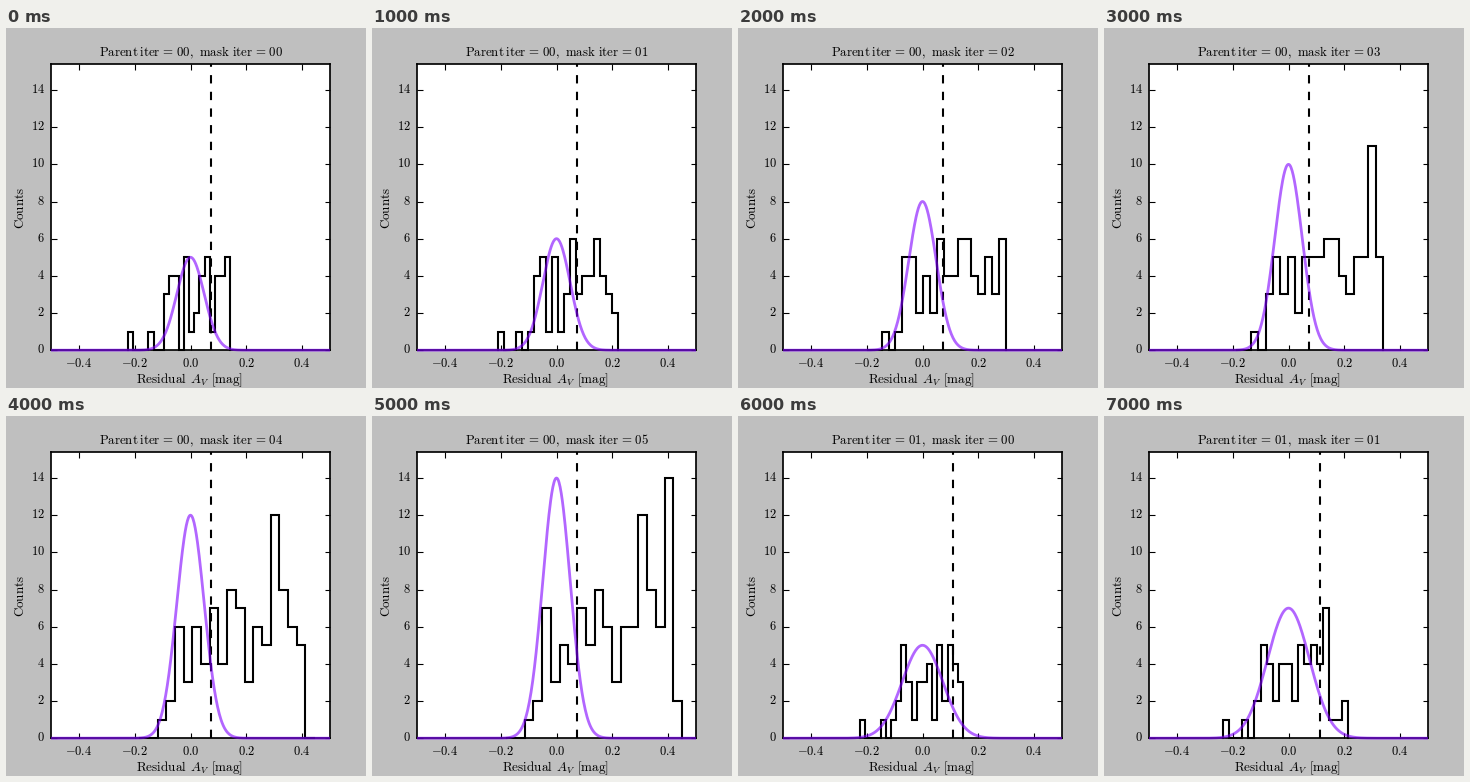
A matplotlib script for the animation above (8000 ms loop, 360x360 px).

```python
import matplotlib.pyplot as plt
import numpy as np
from matplotlib.animation import FuncAnimation

SIZE = 360
LEFT, RIGHT, TOP, BOTTOM = 45, 324, 36, 322.2
Y_MAX = 15.4
BINS = 20
MASKS = 6

plt.rcParams["mathtext.fontset"] = "cm"
plt.rcParams["lines.scale_dashes"] = False
fig = plt.figure(figsize=(SIZE / 72, SIZE / 72), dpi=72, facecolor="0.75")
ax = fig.add_axes([LEFT / SIZE, 1 - BOTTOM / SIZE,
                   (RIGHT - LEFT) / SIZE, (BOTTOM - TOP) / SIZE])
ax.set(xlim=(-0.5, 0.5), ylim=(0, Y_MAX))
ax.set_xticks([-0.4, -0.2, 0, 0.2, 0.4])
ax.set_yticks(range(0, 15, 2))
ax.tick_params(direction="in", length=5.5, width=1.1, top=True, right=True,
               labelbottom=False, labelleft=False)
for spine in ax.spines.values():
    spine.set_linewidth(1.7)


def label(x, y, text, size=12.5, **kw):
    """Place text at stage pixels, y being the baseline."""
    kw = {"ha": "center", "va": "baseline", **kw}
    return fig.text(x / SIZE, 1 - y / SIZE, text, fontsize=size, **kw)


def to_x(px):
    return (px - LEFT) / (RIGHT - LEFT) - 0.5


def title_text(parent, mask):
    eq = r"\hspace{0.12}=\hspace{0.12}"
    return (rf"$\mathrm{{Parent}}\hspace{{0.22}}\mathrm{{iter}}{eq}"
            rf"\mathrm{{{parent:02d},}}\hspace{{0.38}}"
            rf"\mathrm{{mask\ iter}}{eq}\mathrm{{{mask:02d}}}$")


for v in ax.get_xticks():
    label(LEFT + (v + 0.5) * (RIGHT - LEFT), 339, f"${v:.1f}$")
for v in ax.get_yticks():
    y = BOTTOM - v / Y_MAX * (BOTTOM - TOP)
    label(39, y + 3, f"${v:.0f}$", ha="right")

title = label(185, 28, "", 12.9)
label(184, 355, r"$\mathrm{Residual}\hspace{0.42}A_V\hspace{0.42}"
                r"\mathrm{[mag]}$", 13.2)
label(14, 180, r"$\mathrm{Counts}$", 13, rotation=90, va="center")

# All residuals of each parent: first pixel, bin width, counts
profiles = [
    (130.7, 5.1, [1, 0, 0, 0, 1, 0, 0, 3, 4, 4, 0, 5, 1, 2, 4, 5, 1, 4, 4, 5,
                  4, 3, 1, 3, 4, 2, 5, 9, 4, 5, 3, 4, 12, 3, 1]),
    (122, 5.15, [1, 0, 0, 0, 1, 0, 1, 2, 5, 3, 1, 3, 3, 4, 1, 5, 2, 5, 4, 3,
                 6, 1, 1, 1, 2]),
]
rights = [224, 246, 268, 279, 308, 310, 225, 244]
peaks = [5, 6, 8, 10, 12, 14, 5, 7]


def span_and_shift(parent, mask):
    """Left end of the histogram and how far the residuals have moved."""
    if parent:
        return 122 - 3 * mask, 5 * mask
    rest = (1 - mask / (MASKS - 1)) ** 1.8
    return 135 - 13 * rest, 8.7 * rest


def histogram(parent, mask, right):
    """Bin the residuals that the mask lets through."""
    first, width, counts = profiles[parent]
    left, shift = span_and_shift(parent, mask)
    passed = 44 + round(12.4 * mask)
    total = np.minimum(np.concatenate([[0], np.cumsum(counts)]), passed)
    edges = np.linspace(left, right, BINS + 1)
    at_edges = np.interp(edges + shift,
                         first + width * np.arange(len(total)), total)
    return edges, np.diff(np.round(at_edges))


grid = np.linspace(-0.5, 0.5, 500)
steps, = ax.plot([], [], color="k", lw=2.08, solid_joinstyle="miter",
                 clip_on=False)
cut, = ax.plot([], [], color="k", lw=2.08, dashes=(8.33, 8.33))
bell, = ax.plot([], [], color=(0.5, 0, 1), alpha=0.6, lw=2.78, zorder=5,
                solid_capstyle="butt", clip_on=False)


def update(i):
    parent, mask = divmod(i, MASKS)
    sigma = 0.0729 + 0.0024 * mask if parent else 0.049
    edges, counts = histogram(parent, mask, rights[i])
    steps.set_data(to_x(np.repeat(edges, 2)),
                   np.concatenate([[0], np.repeat(counts, 2), [0]]))
    bell.set_data(grid, peaks[i] * np.exp(-0.5 * (grid / sigma) ** 2))
    cut.set_data([1.5 * sigma] * 2, [0, Y_MAX])
    title.set_text(title_text(parent, mask))
    return steps, bell, cut, title


anim = FuncAnimation(fig, update, frames=len(rights), interval=1000,
                     repeat=True, repeat_delay=0)
plt.show()
```
